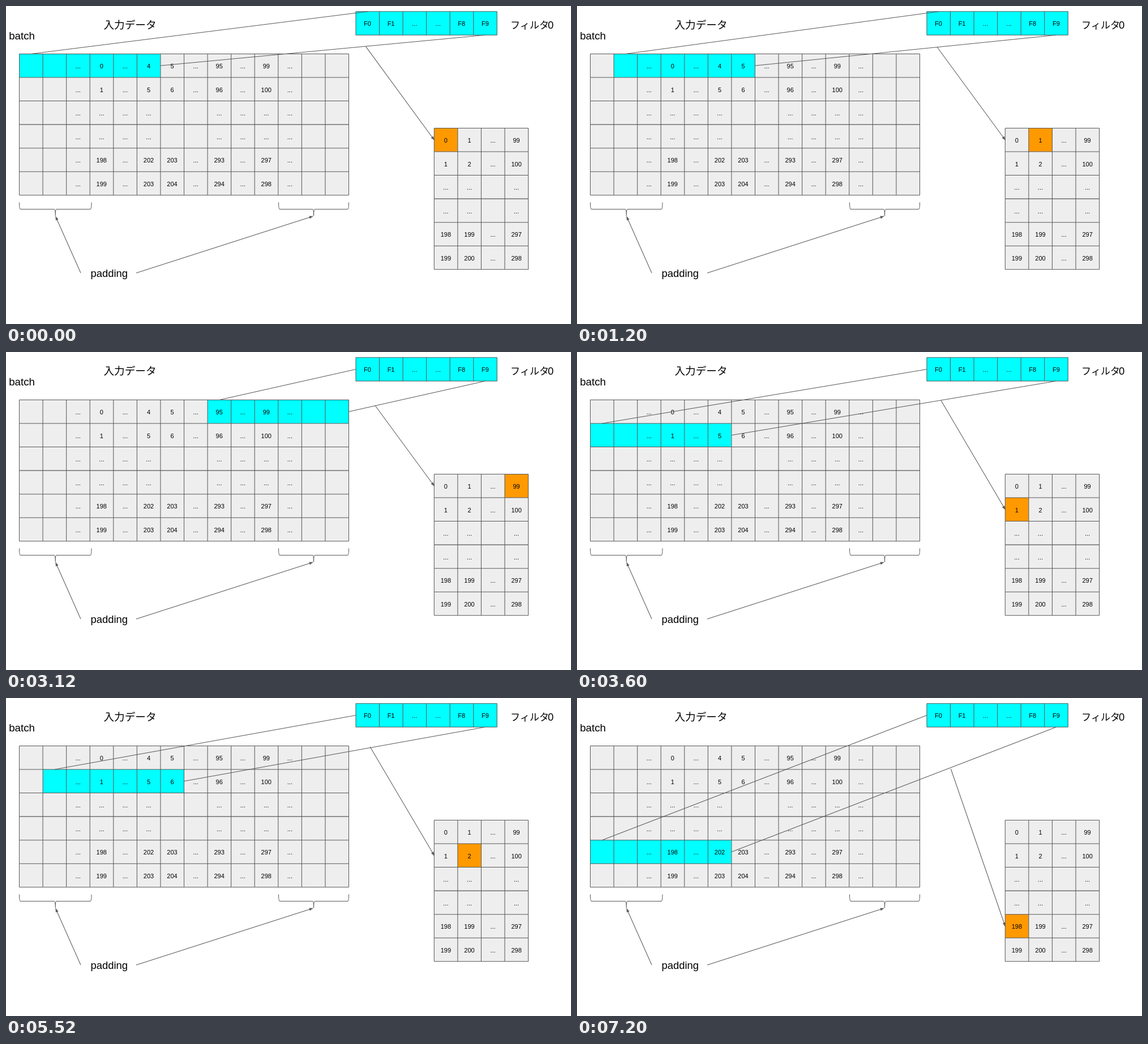
Animation of 998x561 px, one loop 8 s. Source, as an HTML page with a canvas:

```html
<!DOCTYPE html>
<html lang="ja">
<head>
<meta charset="utf-8">
<style>
html, body { margin: 0; width: 100%; height: 100%; overflow: hidden; background: #fff; }
canvas { display: block; }
</style>
</head>
<body>
<canvas width="998" height="561"></canvas>
<script>
const ctx = document.querySelector('canvas').getContext('2d');
const CELL = 41.57, LINE = '#595959', GRAY = '#eeeeee', CYAN = '#00ffff', ORANGE = '#ff9900';
const LATIN = '"Liberation Sans", Arial, sans-serif';
const JAPANESE = '"Liberation Sans", "Noto Sans CJK JP", "Noto Sans CJK", sans-serif';

// Cells are split on "|"; "." stands for an ellipsis.
const parse = rows => rows.map(row => row.split('|').map(s => s === '.' ? '...' : s));
const input = { x: 23.5, y: 84.4, cells: parse([
  '||.|0|.|4|5|.|95|.|99|.||',
  '||.|1|.|5|6|.|96|.|100|.||',
  '||.|.|.|.|||.|.|.|.||',
  '||.|.|.|.|||.|.|.|.||',
  '||.|198|.|202|203|.|293|.|297|.||',
  '||.|199|.|203|204|.|294|.|298|.||']) };
const output = { x: 756.3, y: 215.4, cells: parse([
  '0|1|.|99', '1|2|.|100', '.|.||.', '.|.||.', '198|199|.|297', '199|200|.|298']) };
const filter = { x: 617.9, y: 9.7, cells: parse(['F0|F1|.|.|F8|F9']) };

// Window column, row, output column, and where the result arrow starts.
const STEP = 1200, LOOP = 8000;
const steps = [
  [0, 0, 0, 635.6, 71.6], [1, 0, 1, 636.3, 72.7], [8, 0, 3, 652.4, 95],
  [0, 1, 0, 643, 85.6], [1, 1, 1, 643, 86], [8, 1, 3, 678, 119],
  [0, 4, 0, 660.3, 125]];

function line(x1, y1, x2, y2) {
  ctx.beginPath();
  ctx.moveTo(x1, y1);
  ctx.lineTo(x2, y2);
  ctx.stroke();
}

function arrow(x1, y1, x2, y2) {
  line(x1, y1, x2, y2);
  ctx.save();
  ctx.translate(x2, y2);
  ctx.rotate(Math.atan2(y2 - y1, x2 - x1));
  ctx.beginPath();
  ctx.moveTo(-1, 0);
  ctx.lineTo(-5.7, -1.8);
  ctx.lineTo(-5.7, 1.8);
  ctx.closePath();
  ctx.fillStyle = LINE;
  ctx.fill();
  ctx.stroke();
  ctx.restore();
}

function text(s, x, y, size, align = 'left', family = LATIN, weight = 400) {
  ctx.font = `${weight} ${size}px ${family}`;
  ctx.textAlign = align;
  ctx.fillStyle = '#000';
  ctx.fillText(s, x, y);
}

function table({ x, y, cells }, color) {
  const cols = cells[0].length, rows = cells.length;
  const px = c => x + c * CELL, py = r => y + r * CELL;
  cells.forEach((row, r) => row.forEach((label, c) => {
    ctx.fillStyle = color(c, r);
    ctx.fillRect(px(c), py(r), CELL, CELL);
    text(label, px(c + 0.5) - 0.2, py(r) + 25.6, 11, 'center');
  }));
  for (let c = 0; c <= cols; c++) line(px(c), py(0), px(c), py(rows));
  for (let r = 0; r <= rows; r++) line(px(0), py(r), px(cols), py(r));
}

function brace(left, right) {
  const mid = (left + right) / 2, top = 346.5, tip = 370.5, rx = 2, ry = 12, PI = Math.PI;
  ctx.beginPath();
  ctx.ellipse(left + rx, top, rx, ry, 0, PI, PI / 2, true);
  ctx.ellipse(mid - rx, tip, rx, ry, 0, -PI / 2, 0);
  ctx.ellipse(mid + rx, tip, rx, ry, 0, PI, PI * 1.5);
  ctx.ellipse(right - rx, top, rx, ry, 0, PI / 2, 0, true);
  ctx.stroke();
}

function draw(time) {
  const [col, row, outCol, startX, startY] = steps[Math.floor(time % LOOP / STEP)];
  ctx.fillStyle = '#fff';
  ctx.fillRect(0, 0, 998, 561);
  ctx.strokeStyle = LINE;
  ctx.lineWidth = 1.04;

  table(input, (c, r) => r === row && c >= col && c < col + 6 ? CYAN : GRAY);
  table(output, (c, r) => r === row && c === outCol ? ORANGE : GRAY);
  table(filter, () => CYAN);

  text('入力データ', 172.5, 40, 18.6, 'left', JAPANESE, 500);
  text('フィルタ', 891, 40, 17, 'left', JAPANESE, 500);
  text('0', 957, 40, 18.4);
  text('batch', 5.2, 59, 18.7);
  text('padding', 149.6, 478, 18.4);

  brace(23.5, 151);
  brace(481.5, 605.5);
  arrow(132, 471, 87.7, 371.5);
  arrow(230, 471, 542, 371);

  const x = input.x + col * CELL, y = input.y + row * CELL;
  const nearTop = row === 0 && col < 2;
  line(x + CELL / 2, y, filter.x + (nearTop ? CELL / 2 : 0), filter.y + (nearTop ? 0 : CELL / 2));
  line(x + 6 * CELL, y + CELL / 2, filter.x + 5.5 * CELL, filter.y + CELL);
  arrow(startX, startY, output.x, output.y + (row + 0.5) * CELL);
}

function tick() {
  draw(performance.now());
  requestAnimationFrame(tick);
}
tick();
</script>
</body>
</html>
```
